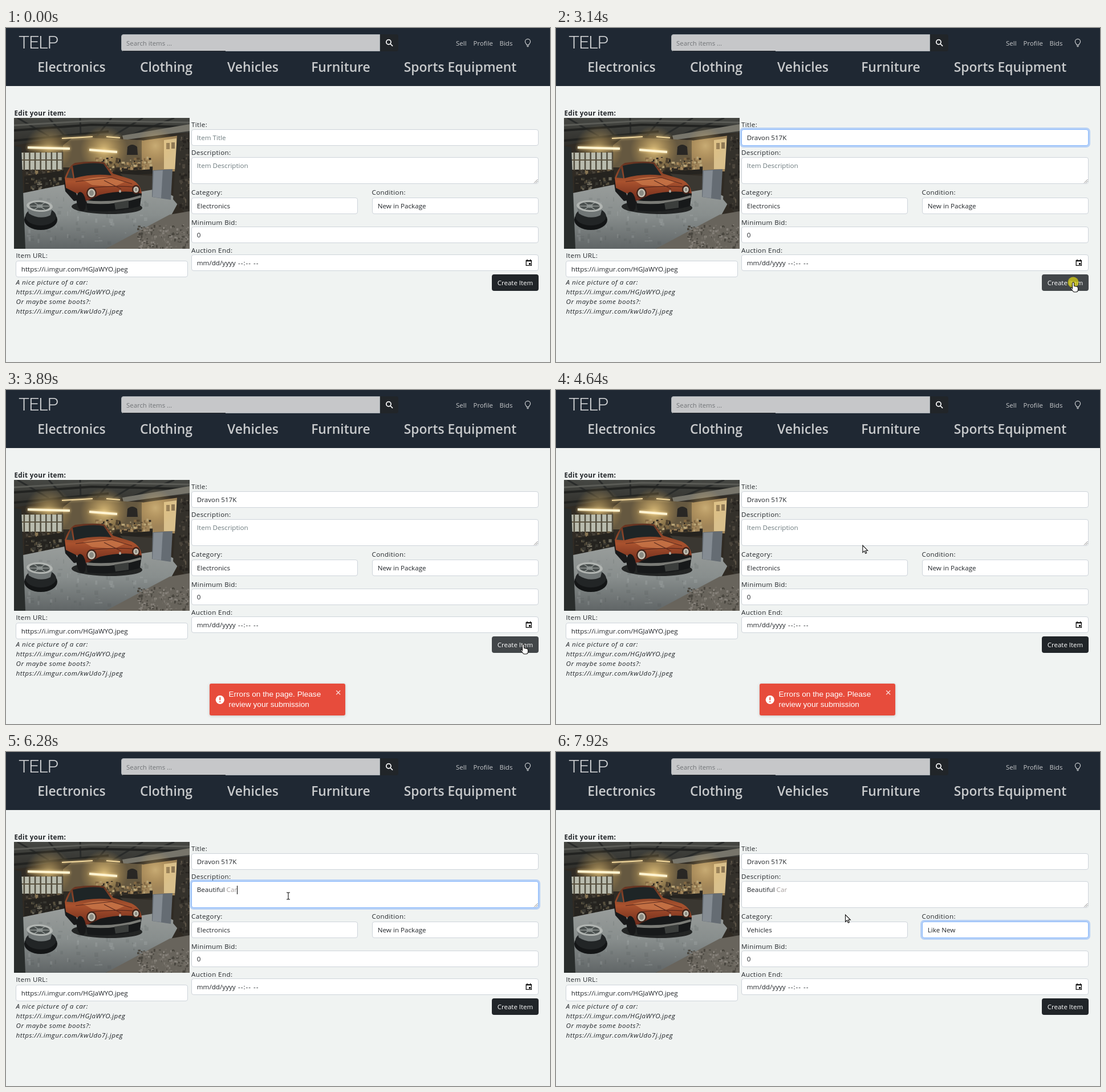
Animation, 954 px wide and 587 px high, one loop 8 s. Source, as an HTML page with a canvas:

```html
<!DOCTYPE html>
<html lang="en">
<head>
<meta charset="utf-8">
<title>Edit your item</title>
<style>
  html, body { margin: 0; width: 100%; height: 100%; overflow: hidden; background: #f0f3f2; }
  #stage { position: relative; width: 954px; height: 587px; overflow: hidden; background: #f0f3f2;
    font: 11.65px/20px "Open Sans", "Noto Sans", sans-serif; color: #212529; }
  #stage > * { position: absolute; box-sizing: border-box; }
  .text { white-space: pre; height: 20px; }
  .label { letter-spacing: .35px; }
  .bold { font-weight: 700; }
  .hint { font-style: italic; letter-spacing: .52px; }
  .nav { color: #c8cacc; font-size: 11.5px; }
  .head { color: #c8cacc; font-size: 22.9px; font-weight: 600; transform: translateX(-50%); }
  .logo { color: #d0d2d4; font: 300 32px/20px Roboto, "Open Sans", sans-serif; letter-spacing: -1.2px; }
  .search { color: #717477; font-size: 11.4px; }
  .dashes { letter-spacing: 1px; }
  .field { background: #fff; border: 1px solid #ced4da; border-radius: 4px; }
  .placeholder { color: #6c7a7e; }
  .faint { color: #a39c9a; }
  .caret { display: inline-block; width: 1px; height: 15px; margin-right: -1px; background: #000; vertical-align: middle; }
  #header { left: 0; top: 0; width: 954px; height: 102px; background: #1f2833; }
  #searchBox { left: 202px; top: 11px; width: 454px; height: 30px; background: #c6c7c9;
    border: 1px solid #a5abb0; border-radius: 4px 0 0 4px; }
  #searchEdge { left: 205px; top: 40px; width: 180px; height: 1px; background: #22262b; }
  #searchButton { left: 656px; top: 11px; width: 32px; height: 30px; background: #212529; border-radius: 0 4px 4px 0; }
  #create { left: 852px; top: 433px; width: 82px; height: 29px; border-radius: 4px; color: #fff;
    font-size: 11.5px; line-height: 29px; text-align: center; }
  #toast { left: 357px; top: 516px; width: 238px; height: 56px; background: #e74c3c; border-radius: 3px;
    box-shadow: 0 1px 5px rgba(0,0,0,.18); color: #fff; }
  #toast div { position: absolute; left: 33.5px; top: 10px; font: 13.6px/17.5px "Liberation Sans", Arial, sans-serif; white-space: pre; }
  #toast svg { position: absolute; left: 0; top: 0; }
  #photo { left: 14px; top: 158px; }
  #icons { left: 0; top: 0; z-index: 1; }
  #overlay { left: 0; top: 0; z-index: 2; }
</style>
</head>
<body>
<div id="stage">
  <div id="header"></div>
  <div id="searchBox"></div>
  <div id="searchEdge"></div>
  <div id="searchButton"></div>
  <canvas id="photo" width="308" height="230"></canvas>
  <div id="create">Create Item</div>
  <svg id="icons" width="954" height="587" fill="none">
    <g stroke="#fff" stroke-width="1.7" stroke-linecap="round"><circle cx="671" cy="24.8" r="4.1"/><path d="M674.2 28l3.4 3.4"/></g>
    <path stroke="#d5d7d9" stroke-width="1.1" d="M913 29.5c0-2-2.6-2.6-2.6-5.5a4.6 4.6 0 0 1 9.2 0c0 2.9-2.6 3.5-2.6 5.5zM913 31.2h4M913.7 32.7h2.6"/>
    <path stroke="#111" stroke-width="1.3" d="M912.2 408.7h9.2v8.6h-9.2zM912 409.6h9.6M914 406.6v2M919.6 406.6v2"/>
    <path fill="#111" d="M917 413h3v3h-3z"/>
    <path stroke="#777" stroke-width=".9" d="M926 272.5l6.5-6.5M929 272.5l3.5-3.5"/>
  </svg>
  <div id="toast">
    <div>Errors on the page. Please
review your submission</div>
    <svg width="238" height="56" fill="none">
      <circle cx="18.3" cy="28.3" r="7.6" fill="#fff"/>
      <path stroke="#e74c3c" stroke-width="1.8" d="M18.3 24v5.3M18.3 31v1.9"/>
      <path stroke="#fff" stroke-opacity=".8" stroke-width="1.3" d="M222.2 12.3l7 7M229.2 12.3l-7 7"/>
    </svg>
  </div>
  <canvas id="overlay" width="954" height="587"></canvas>
</div>
<script>
const LOOP = 8000;
const stage = document.getElementById('stage');
const toast = document.getElementById('toast');
const create = document.getElementById('create');
const pen = document.getElementById('overlay').getContext('2d');

function add(cls, x, y) {
  const el = document.createElement('div');
  el.className = cls;
  el.style.left = x + 'px';
  el.style.top = y + 'px';
  stage.insertBefore(el, toast);
  return el;
}
// y is the middle of the line
function text(x, y, str, cls = '') {
  const el = add('text ' + cls, x, y - 10);
  el.textContent = str;
  return el;
}
function field(x, y, w, h, str = '') {
  const box = add('field', x, y);
  box.style.width = w + 'px';
  box.style.height = h + 'px';
  return { box, line: text(x + 9.8, y + 14.7, str) };
}
function typingField(x, y, w, h, hint) {
  const f = field(x, y, w, h);
  for (const part of ['typed', 'faint', 'caret', 'placeholder']) {
    f[part] = document.createElement('span');
    f[part].className = part;
    f.line.append(f[part]);
  }
  f.placeholder.textContent = hint;
  return f;
}

text(22, 25, 'TELP', 'logo');
text(211, 26.5, 'Search items ...', 'search');
text(789, 26.5, 'Sell', 'nav');
text(819.5, 26.5, 'Profile', 'nav');
text(865.5, 26.5, 'Bids', 'nav');
text(115, 68.5, 'Electronics', 'head');
text(281, 68.5, 'Clothing', 'head');
text(433, 68.5, 'Vehicles', 'head');
text(587, 68.5, 'Furniture', 'head');
text(796.5, 68.5, 'Sports Equipment', 'head');

text(14.5, 149.5, 'Edit your item:', 'label bold');
text(17.5, 400, 'Item URL:', 'label');
field(17, 409, 302, 29, 'https://i.imgur.com/HGJaWYO.jpeg');
['A nice picture of a car:', 'https://i.imgur.com/HGJaWYO.jpeg',
 'Or maybe some boots?:', 'https://i.imgur.com/kwUdo7j.jpeg']
  .forEach((s, i) => text(17.5, 447 + i * 17, s, 'hint'));

text(325, 169.5, 'Title:', 'label');
text(325, 219, 'Description:', 'label');
text(325, 289, 'Category:', 'label');
text(641.5, 289, 'Condition:', 'label');
text(325, 341.5, 'Minimum Bid:', 'label');
text(325, 390.5, 'Auction End:', 'label');
const title = typingField(325, 178, 609, 29, 'Item Title');
const desc = typingField(325, 227, 609, 47, 'Item Description');
const category = field(325, 298, 292, 29);
const condition = field(642, 298, 292, 29);
field(325, 349, 609, 29, '0');
field(325, 398, 609, 29, 'mm/dd/yyyy');
text(407, 412.7, '--:-- --', 'dashes');

// Each track holds [start time, value] steps
const focus = [
  [title, [[250, .5], [400, 1], [3290, .1], [3450, 0]]],
  [desc, [[4780, .5], [4920, 1], [6430, .15], [6580, 0]]],
  [category, [[6430, .5], [6580, 1], [7200, .5], [7350, 0]]],
  [condition, [[7200, .5], [7350, 1]]]
];
const titleKeys = [[700, 1], [860, 3], [1030, 4], [1190, 6], [1490, 7], [1790, 9], [1930, 10], [2220, 11]];
const titleCaret = [[400, 1], [2540, 0]];
const descKeys = [[5540, 2], [5690, 5], [5840, 7], [5990, 9], [6130, 11], [6280, 13]];
const descCaret = [[4920, 1], [5390, 0], [5540, 1], [6430, 0]];
const toastFade = [[3450, .35], [3600, .7], [3740, .9], [3890, 1], [5690, .6], [5840, .25], [5990, 0]];
const clicks = [[250, 1], [400, 0], [3140, 1], [3290, 0], [4780, 1], [4920, 0]];

function at(track, t) {
  let v = 0;
  for (const [time, value] of track) if (t >= time) v = value;
  return v;
}

function showFocus(f, k) {
  const mix = (a, b) => Math.round(a + (b - a) * k);
  f.box.style.borderColor = `rgb(${mix(206, 134)},${mix(212, 183)},${mix(218, 254)})`;
  f.box.style.boxShadow = `0 0 0 3px rgba(13,110,253,${.25 * k})`;
}
function showTyping(f, str, count, caret, plain) {
  f.typed.textContent = str.slice(0, Math.min(count, plain));
  f.faint.textContent = str.slice(plain, Math.max(count, plain));
  f.caret.style.visibility = caret ? 'visible' : 'hidden';
  f.placeholder.style.display = count ? 'none' : 'inline';
}

function glide(from, to, k) {
  const e = k * k * (3 - 2 * k);
  return { x: from[0] + (to[0] - from[0]) * e, y: from[1] + (to[1] - from[1]) * e, kind: 'arrow' };
}
const OVER_TITLE = [606, 197], OVER_BUTTON = [907, 447], OVER_DESC = [495, 253];
function pointer(t) {
  const rest = ([x, y], kind) => ({ x, y, kind });
  if (t < 100) return null;
  if (t < 250) return rest([624, 356], 'arrow');
  if (t < 2540) return rest(OVER_TITLE, 'beam');
  if (t < 2990) return glide(OVER_TITLE, OVER_BUTTON, (Math.floor((t - 2540) / 150) + 1) / 5);
  if (t < 3140) return rest([900, 441], 'hand');
  if (t < 4200) return rest(OVER_BUTTON, 'hand');
  if (t < 4780) return glide(OVER_BUTTON, OVER_DESC, (Math.floor((t - 4200) / 145) + 1) / 5);
  if (t < 7920) return rest(OVER_DESC, 'beam');
  return rest([507.5, 286], 'arrow');
}
const shapes = {
  arrow: new Path2D('M0 0V12.4L2.9 9.7L4.9 14.2L6.9 13.3L5 9H8.8Z'),
  hand: new Path2D('M0 0q1.5 0 1.5 1.5V6.5l5 1q2 .5 2 2.5V13q0 4-4 4H1.8q-1.5 0-3-2.5L-4.5 10.5q0-2 2-1L-1.5 11V1.5Q-1.5 0 0 0Z'),
  beam: new Path2D('M-3-6H-1L0-5L1-6H3M0-5V5M-3 6H-1L0 5L1 6H3')
};
function drawPointer(t) {
  pen.clearRect(0, 0, 954, 587);
  const p = pointer(t);
  if (!p) return;
  if (at(clicks, t)) {
    pen.fillStyle = 'rgba(222,212,16,.72)';
    pen.beginPath();
    pen.arc(p.x, p.y, 9.5, 0, 7);
    pen.fill();
  }
  pen.save();
  pen.translate(p.x, p.y);
  pen.lineWidth = 1.1;
  pen.strokeStyle = '#111';
  pen.fillStyle = '#fff';
  if (p.kind !== 'beam') pen.fill(shapes[p.kind]);
  pen.stroke(shapes[p.kind]);
  pen.restore();
}

function drawPhoto() {
  const g = document.getElementById('photo').getContext('2d');
  g.translate(-14, -158);
  let seed = 11;
  const rnd = () => (seed = seed * 16807 % 2147483647) / 2147483647;
  const shape = (color, d) => { g.fillStyle = color; g.fill(new Path2D(d)); };
  const line = (color, width, d) => { g.strokeStyle = color; g.lineWidth = width; g.stroke(new Path2D(d)); };
  const rect = (color, x, y, w, h) => { g.fillStyle = color; g.fillRect(x, y, w, h); };
  const oval = (color, x, y, rx, ry, turn = 0) => {
    g.fillStyle = color;
    g.beginPath();
    g.ellipse(x, y, rx, ry, turn, 0, 7);
    g.fill();
  };
  const fade = (y0, y1, ...colors) => {
    const f = g.createLinearGradient(0, y0, 0, y1);
    colors.forEach((c, i) => f.addColorStop(i / (colors.length - 1), c));
    return f;
  };
  const glow = (x, y, r, color) => {
    const f = g.createRadialGradient(x, y, 0, x, y, r);
    f.addColorStop(0, color);
    f.addColorStop(1, 'rgba(230,180,90,0)');
    rect(f, x - r, y - r, 2 * r, 2 * r);
  };
  const scatter = (n, x, y, w, h, size, colors) => {
    for (let i = 0; i < n; i++) {
      rect(colors[Math.floor(rnd() * colors.length)], x + rnd() * w, y + rnd() * h, 1 + rnd() * size, 1 + rnd() * size);
    }
  };

  // Walls and ceiling
  rect('#302b24', 14, 158, 308, 230);
  shape(fade(158, 205, '#454743', '#302f2b'), 'M14 158H322V184L205 191L120 186L14 207Z');
  for (let i = 0; i < 6; i++) line('#292b2a', 3, `M${20 + i * 55} 158L${75 + i * 28} 190`);
  line('#5a5b56', 3, 'M14 171L150 163L322 166');
  line('#222321', 4, 'M14 180L150 170L322 174M14 198L180 182');
  shape('#77756b', 'M204 189L322 169V181L206 197Z');
  shape('#655840', 'M118 192L240 197V245H100V206Z');
  shape('#9f8459', 'M238 198L303 189V252H238Z');
  shape('#d9c08c', 'M277 197L299 194V248H277Z');
  shape('#8b7655', 'M281 202h6v11h-6zM290 201h6v11h-6z');
  glow(75, 212, 42, 'rgba(250,215,135,.65)');
  glow(172, 214, 42, 'rgba(255,220,140,.75)');
  glow(262, 207, 34, 'rgba(250,220,150,.45)');
  g.save();
  g.shadowColor = '#ffdf98';
  g.shadowBlur = 5;
  line('#fff4d2', 4, 'M38 210L112 212M146 214L195 218');
  line('#f6dca0', 2, 'M98 194L152 191M176 191L200 193');
  g.restore();

  // Windows, shelves and clutter
  rect('#b9bbad', 22, 219, 78, 30);
  for (let x = 21; x < 102; x += 9.6) rect('#514c3e', x, 218, 2.5, 32);
  rect('#5d5542', 22, 231, 78, 2);
  scatter(80, 34, 248, 75, 26, 5, ['#272521', '#6b5c43', '#8a7755', '#48433a']);
  scatter(120, 155, 226, 98, 28, 5, ['#2b2721', '#806742', '#a4875c', '#51432f', '#b9a577']);
  shape('#25231f', 'M32 261L102 250V286L32 292ZM185 253L257 248V256L188 261Z');
  scatter(45, 34, 262, 62, 24, 5, ['#57503f', '#383731', '#6f6a5c']);
  shape('#292724', 'M213 209Q221 201 230 209L231 223H212Z');

  // Floor and right side
  shape(fade(270, 388, '#9a9e9c', '#888e8d', '#606566'), 'M30 290L108 274L184 261L257 278L305 301L285 338L175 388H28Z');
  scatter(110, 35, 295, 210, 80, 7, ['rgba(190,195,195,.18)', 'rgba(60,65,66,.12)']);
  shape('#3a3731', 'M200 256L258 260V284L234 288Z');
  shape('#656c73', 'M257 250L292 248L289 302L256 297Z');
  shape('#858c93', 'M259 251L275 250L272 299L257 297Z');
  shape('#34312b', 'M300 189L322 184V335L293 301Z');
  scatter(65, 303, 190, 18, 125, 5, ['#5b5346', '#26231f', '#4a443b']);
  shape('#68645c', 'M322 322L287 328L257 344L175 388H322Z');
  scatter(200, 230, 345, 90, 42, 4, ['#858079', '#49463f', '#716c64']);
  shape('#292d2c', 'M14 207L27 210L34 388H14Z');

  // Car
  oval('rgba(17,18,18,.85)', 177, 315, 62, 12, .02);
  shape('#18191a', 'M101 265Q107 260 114 267L128 303L119 304L104 287Z');
  shape(fade(236, 304, '#643321', '#a9522e', '#6e2a1b'),
    'M103 264Q110 242 121 237Q150 233 172 236L188 256L220 266Q238 275 238 293L226 306L144 308L129 293L105 281Z');
  shape('#1e2526', 'M117 242Q149 235 171 239L185 259Q151 255 120 264Z');
  shape('#333a39', 'M106 263L114 245L118 264Z');
  shape('rgba(214,132,82,.6)', 'M135 267Q160 260 184 263L209 270L190 279L151 276Z');
  line('#59291d', 1.2, 'M122 270L185 263L221 274M148 281Q193 276 232 280M172 268L202 283');
  oval('#171819', 132, 305, 8, 17, -.15);
  shape('#17191a', 'M140 305L165 293Q196 286 222 288L238 291L235 313Q190 326 143 321Z');
  shape('#7a7b76', 'M141 303Q190 308 236 294L237 298Q190 313 142 308Z');
  for (const [x, y, r] of [[150, 290, 9], [228, 284, 7]]) {
    oval('#42241b', x, y, r, r + 1);
    oval('#c4c1b4', x, y, r - 2.3, r - 1.5);
    oval('#8b8b83', x, y, r - 5, r - 4);
  }
  oval('#b1aba0', 200, 287, 2, 2.5);
  shape('#3b3e3c', 'M190 307L215 303V316L192 319Z');

  // Loose wheels
  oval('#131516', 61, 337, 29, 18);
  oval('#222526', 61, 331, 27, 16);
  shape('#707676', 'M36 312L82 313L78 329Q59 338 40 326Z');
  oval('#b2b6b3', 59, 313, 23, 10, .06);
  oval('#4b5150', 59, 313, 18, 7, .06);
  for (let i = 0; i < 6; i++) {
    const a = i * Math.PI / 3;
    line('#a0a5a2', 1.2, `M59 313L${59 + 18 * Math.cos(a)} ${313 + 7 * Math.sin(a)}`);
  }
  oval('#8c9290', 59, 313, 6, 3);
}

function render(now) {
  const t = now % LOOP;
  for (const [f, track] of focus) showFocus(f, at(track, t));
  showTyping(title, 'Dravon 517K', at(titleKeys, t), at(titleCaret, t), 11);
  showTyping(desc, 'Beautiful Car', at(descKeys, t), at(descCaret, t), 10);
  category.line.textContent = t < 6920 ? 'Electronics' : 'Vehicles';
  condition.line.textContent = t < 7490 ? 'New in Package' : 'Like New';
  create.style.background = t >= 2990 && t < 4200 ? '#424649' : '#212529';
  toast.style.opacity = at(toastFade, t);
  drawPointer(t);
}

drawPhoto();
const begin = performance.now();
function tick() {
  render(performance.now() - begin);
  requestAnimationFrame(tick);
}
tick();
</script>
</body>
</html>
```
